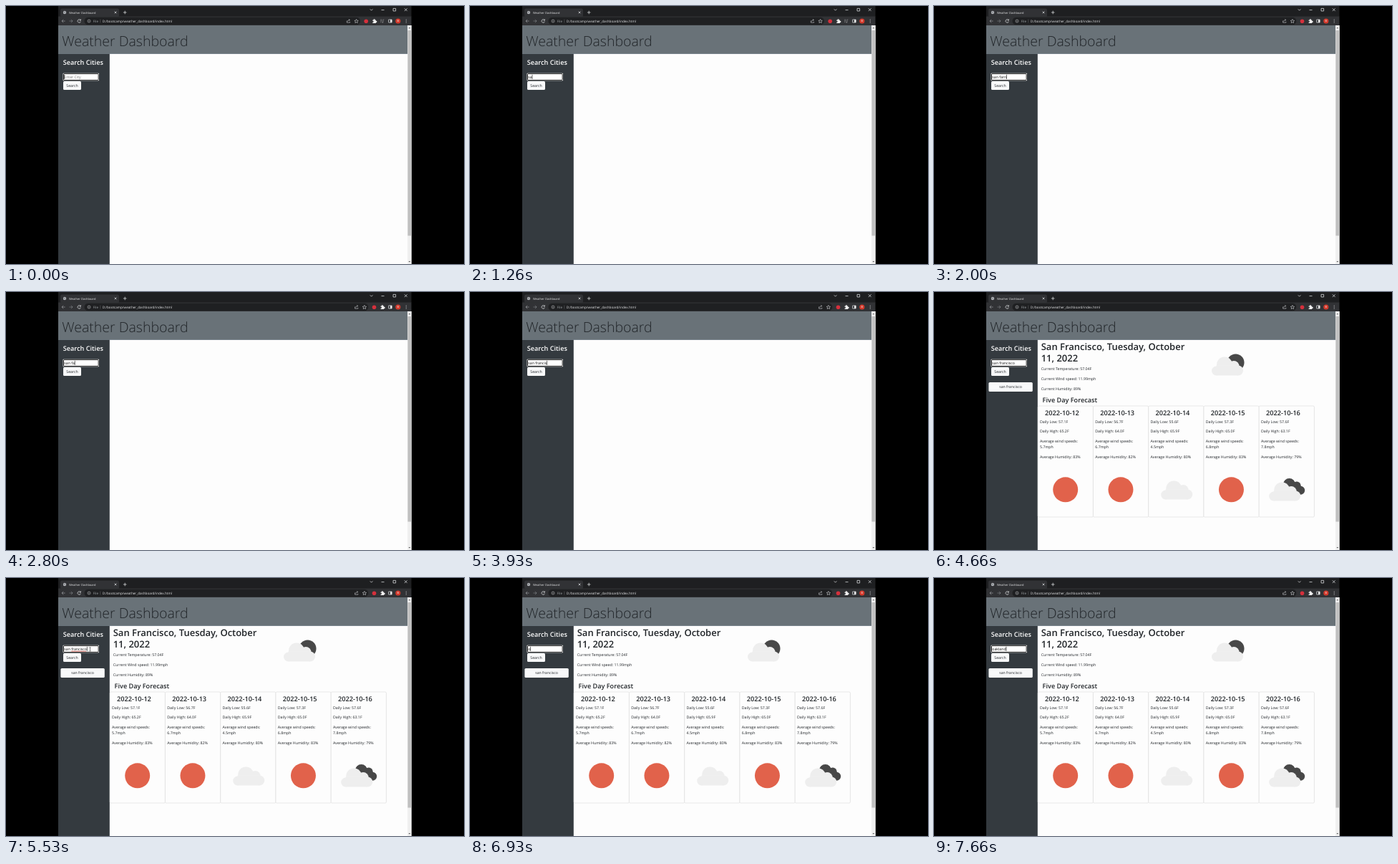
These frames come from a looping animation (640x360 px, 8 s). An HTML page:

```html
<!DOCTYPE html>
<html lang="en">
<head>
<meta charset="utf-8">
<title>Weather Dashboard</title>
<style>
html, body { margin: 0; width: 100%; height: 100%; overflow: hidden; background: #000; }
svg { display: block; width: 640px; height: 360px; }
text { font-family: "Open Sans", "Noto Sans", sans-serif; text-rendering: geometricPrecision; white-space: pre; fill: #212529; }
.semi { font-weight: 600; }
.line { fill: none; stroke: #d4d6d8; stroke-width: .8; }
.cloud { fill: #eee; }
.dark { fill: #484848; }
.sun { fill: #e1624b; }
</style>
</head>
<body>
<svg id="stage" viewBox="0 0 640 360"></svg>
<script>
const text = (x, y, size, str, attrs = '') => `<text x="${x}" y="${y}" font-size="${size}" ${attrs}>${str}</text>`;
const rect = (x, y, w, h, fill, attrs = '') => `<rect x="${x}" y="${y}" width="${w}" height="${h}" fill="${fill}" ${attrs}/>`;
const circle = (x, y, r, attrs = '') => `<circle cx="${x}" cy="${y}" r="${r}" ${attrs}/>`;
const line = (d, attrs = '') => `<path class="line" d="${d}" ${attrs}/>`;
const small = (x, y, str) => text(x, y, 5.25, str);
const group = (id, content) => `<g id="${id}">${content}</g>`;

// x, y: bottom left corner of the cloud
const cloud = (x, y) => `<g class="cloud" transform="translate(${x} ${y})">` +
  circle(6.5, -6.5, 6.5) + circle(18, -15, 11) + circle(31, -13, 7.5) + circle(37, -7, 7) +
  '<path d="M6.5 0V-14H37V0z"/></g>';

const icons = {
  sun: x => circle(x + 38.5, 275.8, 17.5, 'class="sun"'),
  cloudy: x => cloud(x + 17.5, 289.5),
  overcast: x => `<g class="dark">${circle(x + 42.3, 268.5, 8.5)}${circle(x + 52.5, 270.5, 6)}${circle(x + 58, 276.8, 6)}` +
    `<path d="M${x + 42} 270h16v12.8h-16z"/></g>` + cloud(x + 14, 291.5)
};

const days = [
  ['57.1', '65.2', '5.7', 83, 'sun'],
  ['56.7', '64.0', '6.7', 82, 'sun'],
  ['55.6', '65.9', '4.5', 80, 'cloudy'],
  ['57.3', '65.0', '6.8', 83, 'sun'],
  ['57.6', '63.1', '7.8', 79, 'overcast']
];
const cardX = i => 145.2 + 77.25 * i;
const card = ([low, high, wind, humidity], i) => {
  const x = cardX(i), tx = x + 2.8;
  return rect(x, 159, 77.25, 155, '#fdfdfd', 'stroke="#dedede" stroke-width=".7" rx="1.6"') +
    text(x + 9.8, 171.6, 9.2, `2022-10-${12 + i}`, 'class="semi"') +
    small(tx, 182.5, `Daily Low: ${low}F`) + small(tx, 196.4, `Daily High: ${high}F`) +
    small(tx, 210.4, 'Average wind speeds:') + small(tx, 218.4, `${wind}mph`) +
    small(tx, 232.3, `Average Humidity: ${humidity}%`);
};

const browser =
  rect(73, 0, 493.5, 15, '#1e1f21') + rect(76, 3.5, 82, 12, '#313235', 'rx="2.5"') + rect(73, 14.5, 493.5, 12.5, '#313235') +
  circle(82, 9, 2.2, 'fill="#b9bcc0"') + line('M80.5 8.3l1.6 .5 .4 1.4M82.6 7.2l.6 1', 'style="stroke:#44464a;stroke-width:.6"') +
  text(88, 10.5, 4, 'Weather Dashboard', 'style="fill:#e4e5e7"') +
  line('M151.7 7.6l2.7 2.7m0-2.7l-2.7 2.7M166.2 6.7v4.6m-2.3-2.3h4.6') +
  line('M508.8 4.4l1.8 1.8 1.8-1.8M524.5 5.6h4M541 3.4h3.6v3.6h-3.6zM556.8 3.3l3.8 3.8m0-3.8l-3.8 3.8') +
  line('M82.6 21h-4.6m2.2-2.2l-2.2 2.2 2.2 2.2', 'opacity=".55"') + line('M88.5 21h4.6m-2.2-2.2l2.2 2.2-2.2 2.2', 'opacity=".4"') +
  line('M104 19.6a2.2 2.2 0 1 0 .4 2M104.4 18.3v1.8h-1.8') +
  rect(109.5, 15.8, 385.5, 10.4, '#1f2022', 'id="pill" rx="5.2"') +
  circle(116, 21, 2, 'class="line" style="stroke-width:.5"') + line('M116 20.7v1.3M116 19.7v.4', 'style="stroke-width:.5"') +
  text(121.8, 22.7, 4.5, 'File', 'style="fill:#a5a8ac"') + line('M131.8 18.5v5', 'style="stroke-width:.4;opacity:.5"') +
  text(134.8, 22.7, 4.6, 'D:/bootcamp/weather_dashboard/index.html', 'style="fill:#e4e5e7"') +
  group('tools',
    line('M476.3 20.5v2.6h4.3v-1.2M477.5 21.5c.2-1.5 1-2 2.7-2m-1-1.2l1.3 1.2-1.3 1.2', 'style="stroke-width:.6"') +
    line('M489.6 18.5l.8 1.7 1.9.2-1.4 1.3.4 1.9-1.7-1-1.7 1 .4-1.9-1.4-1.3 1.9-.2z', 'style="stroke-width:.6"') +
    circle(503.2, 21.2, 2.8, 'fill="#d5303c"') +
    '<path d="M512.3 19.6h1.4a1 1 0 1 1 1.8 0h1.4v1.4a1 1 0 1 1 0 1.8v1.2h-4.6v-1.4a.9 .9 0 1 0 0-1.6z" fill="#f0f0f0"/>') +
  group('media', line('M523 19.2h2.6m-2.6 1.6h2.6m-2.6 1.6h1.6M527 22.6v-3.6h1.3', 'opacity=".6" style="stroke-width:.6"') +
    circle(526.3, 22.7, .8, 'fill="#999"')) +
  line('M534.7 19h4.4v4h-4.4z') + rect(537, 19, 2.2, 4, '#e8e8e8') +
  circle(547.8, 21, 3.6, 'fill="#d33a2c"') + text(547.8, 22.4, 3.8, 'B', 'text-anchor="middle" style="fill:#fff"') +
  [19, 21, 23].map(y => circle(559.2, y, .55, 'fill="#d4d6d8"')).join('');

const page =
  rect(73, 27, 493.5, 333, '#fdfdfd') + rect(73, 27, 488, 39.8, '#697278') + rect(73, 66, 488, .8, '#76818b') +
  rect(73, 66.8, 71.8, 293.2, '#343a3f') +
  rect(561, 27, 5.5, 333, '#f0f0f0') + rect(561.4, 34, 4.7, 286.5, '#c1c1c1') +
  '<path d="M562.4 31.3l1.4-1.6 1.4 1.6zM562.4 356l1.4 1.6 1.4-1.6z" fill="#555"/>' +
  text(78.3, 55.6, 19.5, 'Weather Dashboard', 'font-weight="300"') +
  text(79.7, 81.6, 9.15, 'Search Cities', 'class="semi" style="fill:#fff"') +
  rect(79.6, 93.7, 50.4, 10.6, '#fff', 'rx=".8"') +
  rect(80.5, 94.6, 48.6, 8.8, '#fff', 'stroke="#111" stroke-width=".9" rx=".5"') +
  rect(80, 104.9, 25, 12.2, '#f8f9fa', 'rx="1.6"') + text(92.5, 112.8, 5.2, 'Search', 'text-anchor="middle"') +
  rect(0, 95.6, 0, 6.8, '#0078d7', 'id="selection"') +
  text(81.3, 101, 5.2, '', 'id="field"') +
  line('', 'id="squiggle" style="stroke:#e23b30;stroke-width:.7"') +
  rect(0, 95.8, .6, 6.2, '#000', 'id="caret"');

const results =
  group('saved', rect(76.4, 126, 61.4, 13, '#f8f9fa', 'rx="1.6"') + text(107, 134.4, 5.2, 'san francisco', 'text-anchor="middle"')) +
  group('current', text(149.7, 80.5, 13, 'San Francisco, Tuesday, October', 'class="semi"') + text(149.7, 97.1, 13, '11, 2022', 'class="semi"') +
    small(149.8, 108.8, 'Current Temperature: 57.04F') + small(149.8, 122.8, 'Current Wind speed: 11.99mph') +
    small(149.8, 136.7, 'Current Humidity: 89%') + circle(421.5, 98.5, 12, 'class="dark"') + cloud(388, 116.5)) +
  group('forecast', text(151.6, 154, 9.15, 'Five Day Forecast', 'class="semi"') +
    days.map(card).join('') + days.map((day, i) => icons[day[4]](cardX(i))).join('')) +
  line('M-1-2.6h.8q.2 0 .2 .3 0-.3 .2-.3h.8M0-2.3v4.6M-1 2.6h.8q.2 0 .2-.3 0 .3 .2 .3h.8', 'id="pointer" style="stroke:#222;stroke-width:.6"');

const $ = id => document.getElementById(id);
$('stage').innerHTML = browser + page + results;

const typing = [
  [-130, ''], [800, 's'], [1260, 'sa'], [1400, 'san'], [1600, 'san '], [1860, 'san far'],
  [2000, 'san farn'], [2066, 'san farnc'], [2130, 'san farnci'],
  [2460, 'san farn'], [2600, 'san far'], [2800, 'san fa'], [2860, 'san f'], [3060, 'san fr'],
  ...[...'ancisco'].map((_, i) => [3400 + 110 * i, 'san francisco'.slice(0, 7 + i)]),
  [6930, 'o'], [7000, 'oa'], [7200, 'oak'], [7330, 'oakl'], [7460, 'oakla'], [7600, 'oaklan'], [7660, 'oakland']
];
const LOOP = 8000, LEFT = 81.3, RETYPE = 6930, CITY = 'san francisco';
const field = $('field');
const show = (id, visible) => $(id).setAttribute('visibility', visible ? 'visible' : 'hidden');
const place = (id, attrs) => Object.entries(attrs).forEach(([key, value]) => $(id).setAttribute(key, value));
const clamp = v => Math.max(0, Math.min(1, v));
const widthOf = n => n ? field.getSubStringLength(0, n) : 0;

function draw(t) {
  const [typedAt, value] = typing.filter(([at]) => at <= t).pop();
  const drag = t < RETYPE ? clamp((t - 5600) / 330) : 0;
  const split = value.length - Math.round(value.length * drag);

  field.textContent = value || 'Enter City';
  field.style.fill = value ? '#111' : '#757575';
  const end = widthOf(value.length), start = widthOf(split);
  const squiggle = t >= 5060 && t < RETYPE;
  if (squiggle) {
    const from = LEFT + widthOf(4), waves = Math.floor((LEFT + end - from) / 1.6);
    place('squiggle', { d: `M${from} 102.2` + 'q.4-.8 .8 0t.8 0'.repeat(waves) });
  }
  place('selection', { x: LEFT + start, width: end - start });
  place('caret', { x: LEFT + end });
  if (drag) {
    const selected = document.createElementNS(field.namespaceURI, 'tspan');
    selected.textContent = value.slice(split);
    selected.style.fill = '#fff';
    field.replaceChildren(value.slice(0, split), selected);
  }
  show('squiggle', squiggle);
  show('selection', drag > 0);
  show('caret', !drag && (t - typedAt) % 1060 < 530);

  const approach = clamp((t - 5330) / 200);
  place('pointer', { transform: `translate(${121 - 3.5 * approach - 37 * drag} ${101 - 1.6 * approach})` });
  show('pointer', t >= 5330 && t < RETYPE);

  const shift = t < 1530 ? 0 : 11.3;
  place('tools', { transform: `translate(${shift})` });
  place('pill', { width: 385.5 + shift });
  show('media', !shift);
  show('saved', t >= 4330);
  show('current', t >= 4460);
  show('forecast', t >= 4600);
}

const began = performance.now();
(function tick() {
  draw((performance.now() - began) % LOOP);
  requestAnimationFrame(tick);
})();
</script>
</body>
</html>
```
